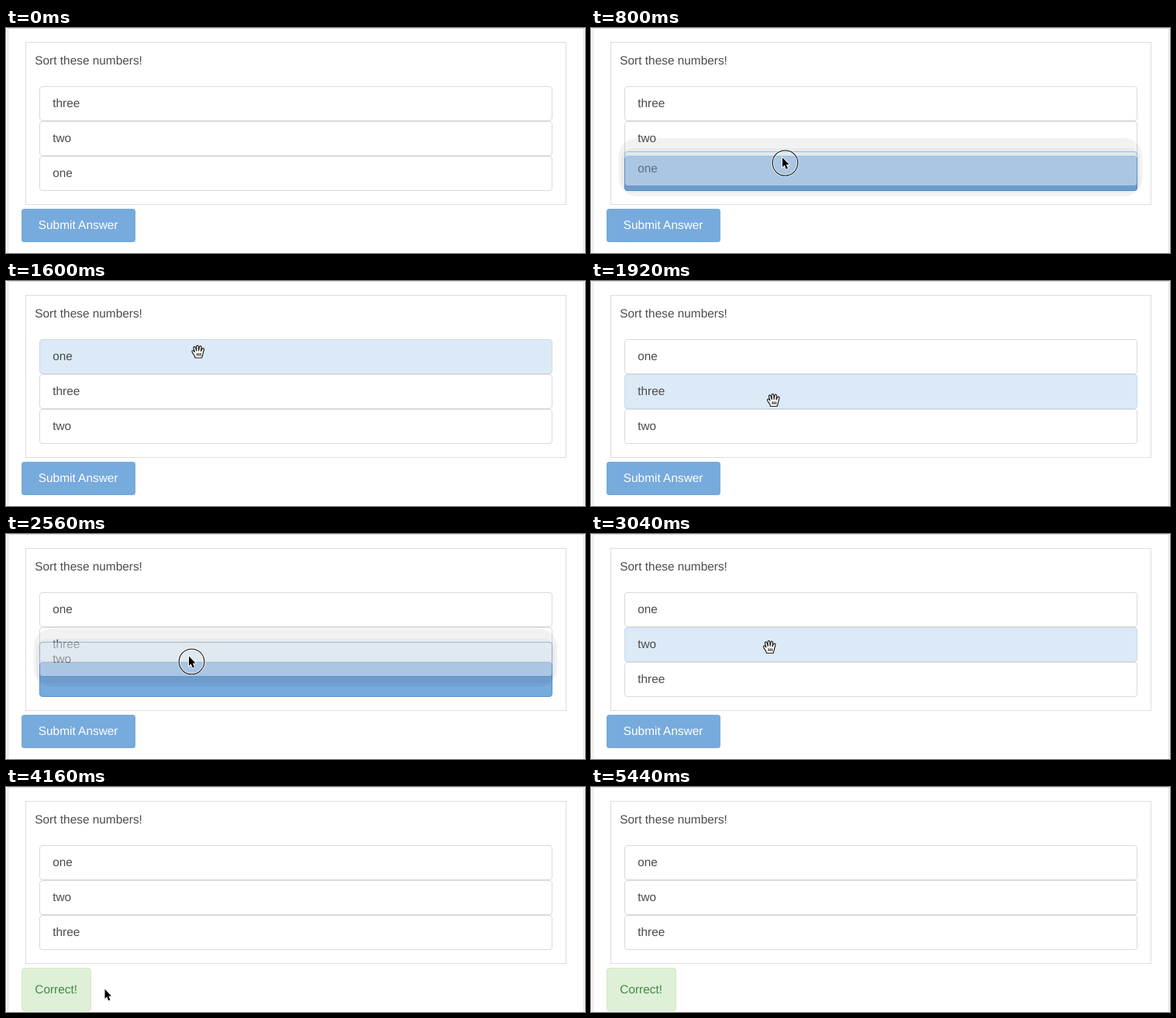
Animation, 747 px wide and 290 px high, one loop 5.76 s. Source, as an HTML page:

```html
<!DOCTYPE html>
<html lang="en">
<head>
<meta charset="utf-8">
<title>Sort these numbers</title>
<style>
  html, body { margin: 0; width: 100%; height: 100%; overflow: hidden; background: #fff; }
  svg { display: block; }
  text { font: 15.4px "Liberation Sans", Arial, sans-serif; fill: #4c4c4c; text-rendering: geometricPrecision; }
  .line { fill: none; stroke: #ddd; }
  .row { fill: #fff; stroke: #d9d9d9; }
  .hover { fill: #dceaf7; stroke: #ccd8e4; }
  .slot { fill: #77aadd; stroke: #5a92cb; }
  .ghost { opacity: .55; }
  .ghost rect { fill: #dceaf7; stroke: #5f93d0; }
  .button { fill: #77aadd; }
  .button + text { fill: #fff; }
  .correct { fill: #dff0d8; stroke: #d3e8bd; }
  .correct + text { fill: #41883f; }
  .ring { fill: none; stroke: #111; stroke-width: 1.1; }
  .halo { fill: none; stroke: #fff; stroke-width: 3; opacity: .7; }
  .arrow { fill: #000; stroke: #fff; paint-order: stroke; stroke-width: 1.6; }
  .hand { fill: #fff; stroke: #222; stroke-width: 1.2; stroke-linejoin: round; }
</style>
</head>
<body>
<svg width="747" height="290" viewBox="0 0 747 290">
  <rect class="line" x="2.5" y=".5" width="743" height="320"/>
  <rect class="line" x="25.5" y="18.5" width="697" height="209"/>
  <text x="37.3" y="47">Sort these numbers!</text>
  <g id="scene"></g>
</svg>
<script>
const LOOP = 5760, TICK = 160, ROW = 45, TOP = 75;
const scene = document.getElementById("scene");

// Pointer centre by tick: [tick, x, y]; linear in between
const path = [
  [1, 300, 196], [2, 262, 186], [4, 250.5, 180.5], [5, 250.5, 174], [6, 250.5, 149],
  [7, 250.5, 122.5], [8, 250, 101], [9, 249, 90], [10, 248, 91], [11, 240, 118],
  [12, 235.5, 153.5], [13, 238, 180], [14, 239.5, 190.5], [15, 239.5, 184],
  [16, 239.5, 164.5], [17, 237, 146], [18, 232, 142], [19, 230.5, 145.5],
  [20, 230.5, 145.5], [21, 212, 188], [22, 172, 238], [23, 136, 264], [24, 131, 267.5],
  [29, 131, 267.5], [30, 154, 267.5]
];
const drags = [
  { from: 5, to: 9, word: "one", grab: 15.5 },
  { from: 15, to: 17, word: "two", grab: 25.5 }
];

function pointer(n) {
  if (n === 33) return [464, 288];
  const i = path.findIndex(p => p[0] >= n);
  if (n < 1 || i < 0) return null;
  const [n1, x1, y1] = path[i], [n0, x0, y0] = path[Math.max(i - 1, 0)];
  const k = n1 > n0 ? (n - n0) / (n1 - n0) : 0;
  return [x0 + (x1 - x0) * k, y0 + (y1 - y0) * k];
}

function order(n) {
  if (n < 8) return ["three", "two", "one"];
  if (n < 9) return ["three", "one", "two"];
  return n < 17 ? ["one", "three", "two"] : ["one", "two", "three"];
}

const label = (x, y, words) => `<text x="${x}" y="${y}">${words}</text>`;
const box = (cls, x, y, w, h, r = 3.5) =>
  `<rect class="${cls}" x="${x}" y="${y}" width="${w}" height="${h}" rx="${r}"/>`;
const item = (cls, y, word) => box(cls, 43.5, y + .5, 661, 44) + label(60.2, y + 27, word);

function ghost(y, word) {
  return `<g opacity=".05">${box("", 35.5, y - 17, 676, 75, 24)}</g>
    <g opacity=".035">${box("", 39, y - 4, 669, 57, 14)}</g>
    <g class="ghost">${item("", y, word)}</g>`;
}

function cursor(x, y, hand, pressed) {
  const ring = pressed
    ? `<circle class="halo" r="16.3"/><circle class="ring" r="16.3"/>` : "";
  const shape = hand
    ? `<path class="hand" d="M-4 8C-4 5-8 2-8 0C-8-2-6-1.7-4.6.5L-6-4.5C-6.5-6.6-4.2-7-3.5-5L-2.2-1L-2.4-6.3
        C-2.4-8.4.2-8.4.3-6.3L.6-1L1.6-6C2-8 4.3-7.5 4-5.5L3.5-.5L5-3.5C6-5.2 8-4 7.4-2.3C6 2 6 4 4.5 8Z
        M-1.4 2V5.5M.8 2V5.5M3 2V5.5"/>`
    : `<path class="arrow" d="M-3.5-7V5.3L-.8 2.8L1.2 7.8L3.4 6.9L1.4 2H5Z"/>`;
  return `<g transform="translate(${x} ${y})">${ring}${shape}</g>`;
}

function draw(n) {
  const at = pointer(n), drag = drags.find(d => n >= d.from && n <= d.to);
  const over = at && !drag && at[0] > 43 && at[0] < 705 ? Math.floor((at[1] - TOP) / ROW) : -1;
  const onRow = over >= 0 && over < 3;
  const pressed = drag || n === 4 || n === 14 || n === 24;

  let out = order(n).map((word, i) => {
    const held = drag && drag.word === word;
    return item(held ? "slot" : i === over ? "hover" : "row", TOP + i * ROW, held ? "" : word);
  }).join("");
  out += n < 25
    ? box("button", 20, 233, 147, 43) + label(41.8, 259, "Submit Answer")
    : box("correct", 20.5, 233.5, 89, 55) + label(37.3, 266, "Correct!");
  if (drag) out += ghost(Math.round(at[1] - drag.grab), drag.word);
  if (at) out += cursor(...at, onRow, pressed);
  scene.innerHTML = out;
}

let shown = -1;
function frame() {
  const n = Math.floor(performance.now() % LOOP / TICK);
  if (n !== shown) draw(shown = n);
  requestAnimationFrame(frame);
}
frame();
</script>
</body>
</html>
```
